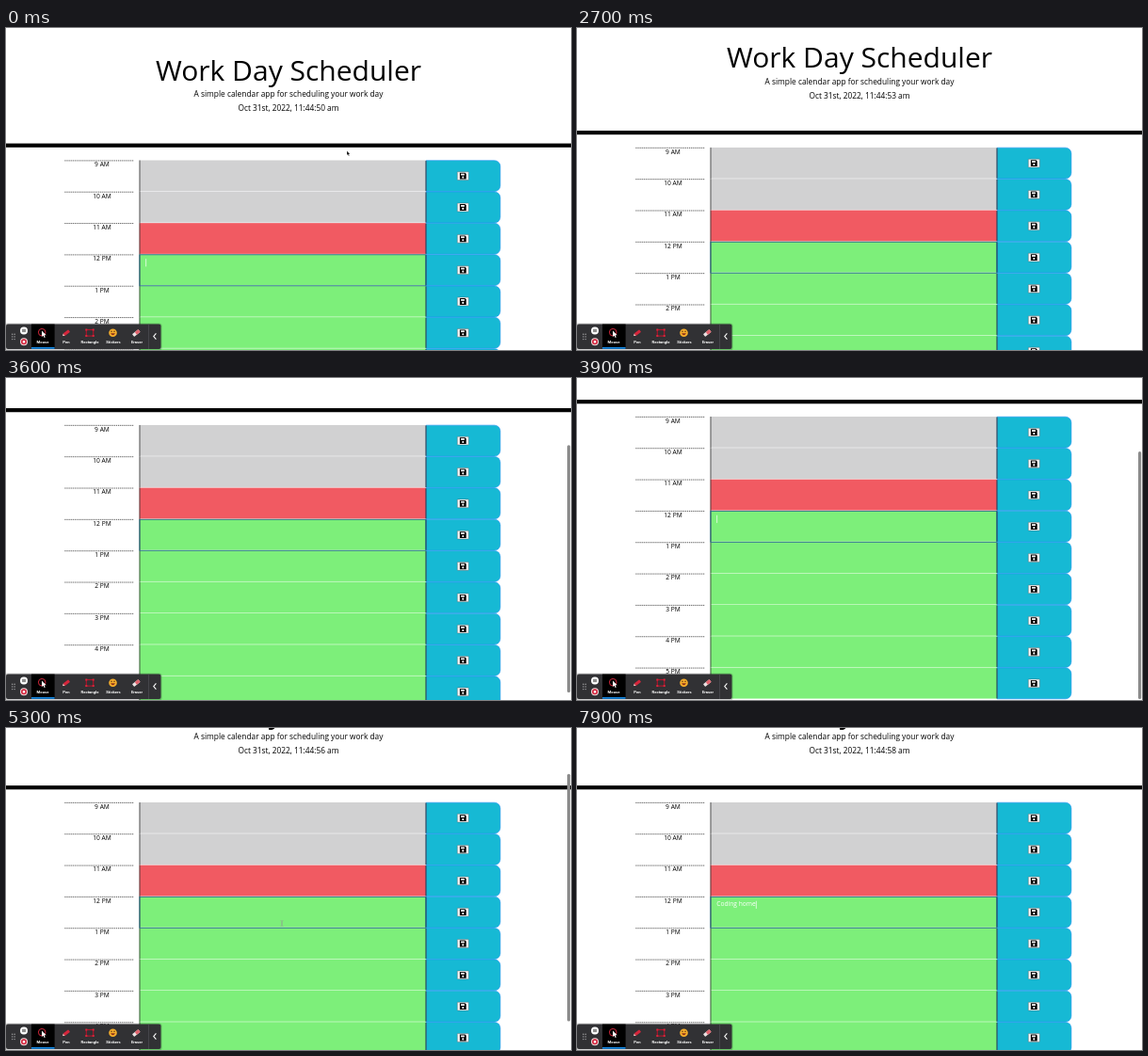
An HTML page that plays this animation: 600x342 px, repeating every 8000 ms.

```html
<!DOCTYPE html>
<html lang="en">
<head>
<meta charset="utf-8">
<title>Work Day Scheduler</title>
<style>
html, body { margin: 0; width: 100%; height: 100%; overflow: hidden; background: #fff; }
svg { display: block; width: 100vw; height: 100vh; }
text { font-family: "Open Sans", "Noto Sans", sans-serif; white-space: pre; }
.mid { text-anchor: middle; }
.hour { font-size: 6.67px; }
.lead { font-size: 8.33px; }
.tool text { font: 700 4.2px Roboto, sans-serif; fill: #fff; text-anchor: middle; }
</style>
</head>
<body>
<svg viewBox="0 0 600 342" preserveAspectRatio="none">
  <g id="page">
    <text class="mid" x="300" y="56" font-size="30">Work Day Scheduler</text>
    <text class="mid lead" x="300" y="73.2">A simple calendar app for scheduling your work day</text>
    <text class="mid lead" x="300" y="88.2" id="clock"></text>
    <rect y="122.6" width="600" height="4.2"/>
    <g id="rows"></g>
    <rect x="141.9" y="240.8" width="304" height="33" fill="none" stroke="#1d5f8f" stroke-width=".8"/>
    <text id="entry" x="148.2" y="250.6" font-size="6.67" fill="#fff"></text>
    <rect id="caret" y="245.2" width=".7" height="8.2" fill="#fff"/>
  </g>
  <rect id="bar" x="596" width="3.2" rx="1.6" fill="#8b8b8b"/>
  <path id="arrow" d="M0 0V4.6L1.1 3.7L1.9 5.4L2.7 5L1.9 3.4H3.3Z" stroke="#fff" stroke-width=".3"/>
  <path id="beam" d="M-1.5 -3Q0 -3 0 -2V2Q0 3 -1.5 3M1.5 -3Q0 -3 0 -2V2Q0 3 1.5 3" fill="none" stroke="#8fae8f" stroke-width=".7"/>
  <g class="tool">
    <rect x="-2" y="313.6" width="167.6" height="29" rx="3" fill="#000" opacity=".18"/>
    <rect x="0" y="314.6" width="164.5" height="26.4" rx="2" fill="#313134"/>
    <g id="dots" fill="#aaa"></g>
    <circle cx="19" cy="321.4" r="4" fill="#fff"/>
    <path d="M18 319.7V323.1M20 319.7V323.1" stroke="#222"/>
    <circle cx="19" cy="333.3" r="4" fill="#f3dede"/>
    <circle cx="19" cy="333.3" r="3" fill="#d3213a"/>
    <rect x="17.8" y="332.1" width="2.4" height="2.4" fill="#fff"/>
    <rect x="27" y="314.6" width="24.6" height="26.4" fill="#000"/>
    <rect x="27" y="339" width="24.6" height="1.8" fill="#1687e0"/>
    <circle cx="38.2" cy="323.2" r="3.8" fill="none" stroke="#d5263b" stroke-width="1"/>
    <path d="M38 321.4V328L39.6 326.6L40.7 328.9L41.7 328.4L40.7 326.2H42.7Z" fill="#fff"/>
    <g transform="translate(64 324) rotate(-38)">
      <rect x="-3" y="-1.6" width="7" height="3.2" rx=".8" fill="#d5263b"/>
      <path d="M-3 -1.6L-5 0L-3 1.6Z" fill="#efb5b5"/>
    </g>
    <rect x="85.3" y="320.5" width="7.4" height="6.6" fill="none" stroke="#b3132b" stroke-width="1.1"/>
    <path d="M84.3 319.6h2v2h-2zM91.7 319.6h2v2h-2zM84.3 326h2v2h-2zM91.7 326h2v2h-2z" fill="#d5263b"/>
    <circle cx="113.5" cy="323.7" r="4.3" fill="#f6ad2b"/>
    <path d="M111 324.3Q113.5 328.4 116 324.3Z" fill="#8a2f1a"/>
    <circle cx="112" cy="322.3" r=".7" fill="#4a2a10"/><circle cx="115" cy="322.3" r=".7" fill="#4a2a10"/>
    <g transform="translate(138.3 324) rotate(-38)">
      <rect x="-4.2" y="-1.8" width="8.4" height="3.6" rx=".8" fill="#e9e1e1"/>
      <rect x="-.6" y="-1.8" width="4.8" height="3.6" rx=".8" fill="#e0626c"/>
    </g>
    <g id="labels"></g>
    <path d="M151.5 314.6V341" stroke="#55555a" stroke-width=".6"/>
    <path d="M159.4 324.4L156.8 327.5L159.4 330.6" fill="none" stroke="#fff" stroke-width="1.1"/>
  </g>
</svg>
<script>
const LOOP = 8000, TOP = 140.5, ROW = 100 / 3, VIEW = 342, PAGE = 441.5;
const $ = id => document.getElementById(id);

// [ms, scroll offset]
const SCROLL = [[2300, 0], [2500, 2.5], [2700, 13.5], [2900, 28], [3200, 59.5],
  [3500, 86], [3800, 99.5], [4050, 99.5], [4500, 80.5], [4800, 61.5]];
const MOUSE_X = [[300, 362], [1100, 330]];
const MOUSE_Y = [[300, 130.5], [1100, 190]];
const WORDS = "Coding home";
const KEYS = [5900, 6200, 6400, 6600, 6700, 6900, 7100, 7200, 7500, 7700, 7880];

function buildRow(i) {
  const y = TOP + i * ROW, h = (i + 9 - 1) % 12 + 1, mid = y + ROW / 2;
  const fill = i < 2 ? "#d1d1d2" : i === 2 ? "#f15a62" : "#7def7a";
  return `
  <path d="M62.3 ${y + .4}H136" stroke="#333" stroke-width=".8" stroke-dasharray="1.25 .85"/>
  <text class="mid hour" x="102" y="${y + 6.7}">${h} ${i < 3 ? "AM" : "PM"}</text>
  <rect x="141.6" y="${y}" width="304.6" height="${ROW}" fill="${fill}"/>
  <path d="M142 ${y + ROW - .2}H446" stroke="#fff" stroke-opacity=".8" stroke-width=".8"/>
  <path d="M142 ${y}v${ROW}" stroke="#333" stroke-width=".8"/>
  <path d="M446.2 ${y + .2}H518.7a6.2 6.2 0 0 1 6.2 6.2V${y + ROW - 6.4}a6.2 6.2 0 0 1 -6.2 6.2H446.2Z" fill="#16b9d4" stroke="#2090f2" stroke-width=".6"/>
  <path d="M446 ${y + .6}v${ROW - 1.2}" stroke="#1c2c33" stroke-width=".9"/>
  <g transform="translate(485.3 ${mid})">
    <rect x="-6" y="-4.4" width="12" height="8.8" rx=".6" fill="#f4f4f4" stroke="#555" stroke-width=".4"/>
    <path d="M-3.4 -3.4H2.2L3.4 -2.2V3.4H-3.4Z"/>
    <path d="M-2.2 -2.5H1.6V-.7H-2.2Z" fill="#fff"/>
    <circle cy="1.4" r="1.1" fill="#fff"/>
  </g>`;
}

$("rows").innerHTML = Array.from({ length: 9 }, (_, i) => buildRow(i)).join("");
$("labels").innerHTML = ["Mouse", "Pen", "Rectangle", "Stickers", "Eraser"]
  .map((s, i) => `<text x="${39 + i * 25}" y="334.6">${s}</text>`).join("");
$("dots").innerHTML = [0, 1, 2, 3, 4, 5]
  .map(i => `<circle cx="${6.7 + i % 2 * 2.4}" cy="${325.2 + (i >> 1) * 2.7}" r=".7"/>`).join("");

function at(keys, t) {
  if (t <= keys[0][0]) return keys[0][1];
  for (let i = 1; i < keys.length; i++) {
    const [a, u] = keys[i - 1], [b, v] = keys[i];
    if (t <= b) return u + (v - u) * (t - a) / (b - a);
  }
  return keys[keys.length - 1][1];
}

const show = (id, on) => $(id).setAttribute("visibility", on ? "visible" : "hidden");
const setText = (id, s) => { if ($(id).textContent !== s) $(id).textContent = s; };

function draw(t) {
  const s = at(SCROLL, t);
  $("page").setAttribute("transform", `translate(0 ${-s})`);
  setText("clock", `Oct 31st, 2022, 11:44:${50 + Math.floor((t + 700) / 1000)} am`);

  const typed = KEYS.filter(k => k <= t).length;
  setText("entry", WORDS.slice(0, typed));
  $("caret").setAttribute("x", 148.4 + (typed ? $("entry").getComputedTextLength() : 0));
  const beat = t % 1000;
  show("caret", typed || t < 300 || beat >= 750 || beat < 180);

  $("bar").setAttribute("y", s * VIEW / PAGE + 1);
  $("bar").setAttribute("height", VIEW * VIEW / PAGE - 2);
  show("bar", t >= 3300 && t < 5900);
  $("bar").setAttribute("opacity", Math.min(1, Math.max(0, (5900 - t) / 400)));

  const x = at(MOUSE_X, t), y = at(MOUSE_Y, t);
  $("arrow").setAttribute("transform", `translate(${x} ${y})`);
  show("arrow", y < TOP);
  const resting = t >= 5000;
  $("beam").setAttribute("transform", resting ? "translate(293 207.5)" : `translate(${x} ${y})`);
  show("beam", resting ? t < KEYS[0] : y >= TOP && t < 2000);
}

const start = performance.now();
function tick() {
  draw((performance.now() - start) % LOOP);
  requestAnimationFrame(tick);
}
tick();
</script>
</body>
</html>
```
